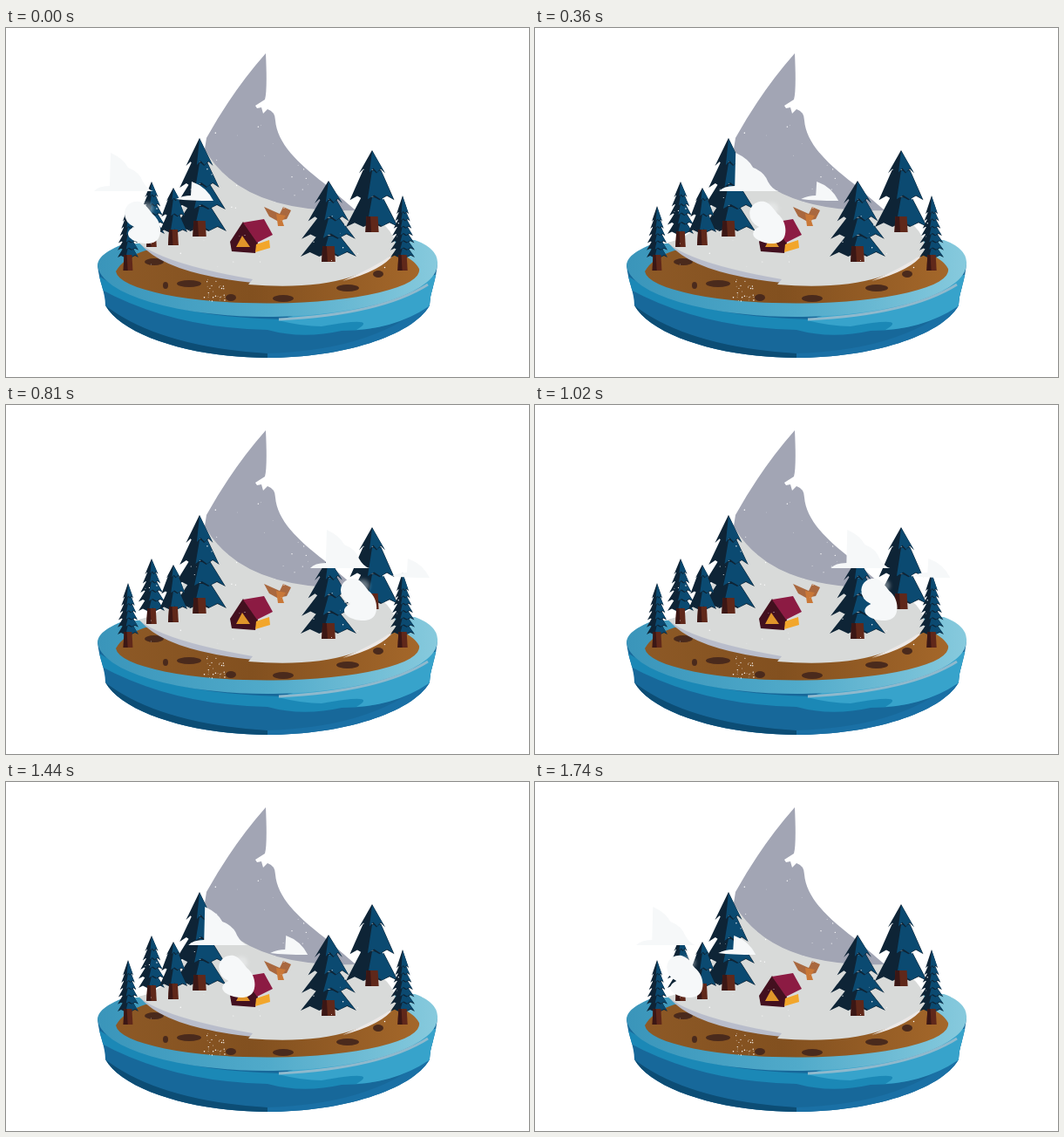
Recreate the animation shown at these times as an HTML page. Size 600x400 px, loop 1770 ms.

```html
<!DOCTYPE html>
<html lang="en">
<head>
<meta charset="utf-8">
<title>Snowy island</title>
<style>
html, body { margin: 0; width: 100%; height: 100%; overflow: hidden; background: #fff; }
svg { display: block; width: 600px; height: 400px; }
.dark { fill: #0e2436; }
.blue { fill: #0b4a71; }
.trunk { fill: #60281a; }
.bark { fill: #3b1715; }
</style>
</head>
<body>
<svg viewBox="0 0 600 400">
  <defs>
    <linearGradient id="rim"><stop offset="0" stop-color="#3a95ba"/><stop offset=".5" stop-color="#50aaca"/><stop offset="1" stop-color="#87cadd"/></linearGradient>
    <linearGradient id="soil"><stop offset="0" stop-color="#8d5926"/><stop offset=".45" stop-color="#82501f"/><stop offset="1" stop-color="#a4672a"/></linearGradient>
    <filter id="soft" x="-50%" y="-50%" width="200%" height="200%"><feGaussianBlur stdDeviation="2"/></filter>
    <clipPath id="hull"><path d="M105 272 C107 292 114 302 114 318 C134 353 215 378 300 378 C385 378 466 353 486 318 C486 303 494 290 495 268Z"/></clipPath>
  </defs>

  <!-- water -->
  <g clip-path="url(#hull)">
    <path fill="#17689a" d="M100 260H500V380H100Z"/>
    <path fill="#0c4d75" d="M100 306 Q160 364 300 373 V390 H100Z"/>
    <path fill="#1a70a5" d="M300 373 Q430 369 490 308 V390 H300Z"/>
    <path fill="#1b88b6" d="M106 284 Q180 334 330 334 L490 288 V312 Q450 347 385 347 Q340 357 300 346 Q190 344 106 298Z"/>
    <path fill="#37a3cb" d="M312 335 L495 282 V312 Q455 343 402 346 Q430 330 362 342 Q340 342 312 335Z"/>
  </g>
  <path fill="url(#rim)" d="M160 246 L131 249 Q105 260 105 272 A195 61 0 0 0 495 268 Q494 252 469 243 L440 244Z"/>
  <path fill="none" stroke="#8fb9cd" stroke-width="3" d="M313 334 Q430 328 484 294"/>

  <!-- soil -->
  <path fill="url(#soil)" d="M126 279 Q135 263 160 255 L445 256 Q468 264 474 276 A174 38 0 0 1 126 279Z"/>
  <g id="rocks" fill="#4a2a1c"></g>

  <!-- snow and mountain -->
  <path fill="#b9bdcb" d="M153 246 Q180 281 283 292 V287 L200 255Z"/>
  <path fill="#d8dad9" d="M229 137 Q204 236 152 246 Q180 270 283 288 L278 294 Q400 304 448 255 Q446 222 400 208Z"/>
  <path fill="#ece8e6" d="M386 290 Q420 276 446 258 Q432 278 386 290Z"/>
  <path fill="#a2a5b4" d="M298 29 Q300 72 297 82 L286 89 L288 92 L293 91 L295 98 L300 93 Q309 96 309 106 C311 132 335 155 365 178 L401 209 Q270 213 228 139 L230 126 Q260 72 298 29Z"/>

  <g id="trees"></g>

  <!-- cabin -->
  <path fill="#43101f" d="M272 222 L257 245 L259 256 L286 258 L289 246Z"/>
  <path fill="#8c1b43" d="M272 223 L296 219 L306 237 L288 246Z"/>
  <path fill="#f2a62b" d="M287 248 L302 243 L303 252 L286 257Z"/>
  <path fill="#e0952a" d="M264 251 L271 238 L280 251Z"/>

  <!-- bird -->
  <path fill="#a9683f" d="M296 205 L314 213 L318 205 L327 209 L322 219 L311 221 L302 216Z"/>
  <path fill="#c97838" d="M310 213 L321 215 L317 221 L319 227 L312 227Z"/>

  <g id="flakes" fill="#fff"></g>

  <!-- clouds -->
  <g id="clouds" fill="#f6f8f9">
    <path d="M120 143 Q135 150 140 160 Q153 165 157 176 Q162 185 169 187 H101 Q106 181 119 181Z"/>
    <path d="M213 176 Q230 182 238 198 Q210 198 195 196 Q203 192 212 192Z"/>
    <ellipse cx="161" cy="207" rx="8" ry="7" opacity=".4" filter="url(#soft)"/>
    <path d="M136 212 C137 202 145 198 153 199 C160 201 164 208 168 213 C178 221 179 234 175 241 C168 253 140 245 140 236 Q140 231 147 228 Q136 223 136 212Z"/>
  </g>
</svg>
<script>
const $ = id => document.getElementById(id);
const NS = 'http://www.w3.org/2000/svg';

function add(parent, tag, attrs) {
  const el = document.createElementNS(NS, tag);
  for (const key in attrs) el.setAttribute(key, attrs[key]);
  $(parent).append(el);
}

const poly = (cls, points) => add('trees', 'polygon', { class: cls, points: points.join(' ') });

// Ragged hem from x1 to x2, its teeth alternating in height.
function hem(x1, x2, y, teeth, depth) {
  return Array.from({ length: teeth + 1 }, (_, i) =>
    [x1 + (x2 - x1) * i / teeth, y - (i % 2) * depth]);
}

// Overlapping skirts, lit on the right, with a tall cap on top.
function tree(x, top, bottom, half, tiers) {
  const height = bottom - top;
  const level = i => i && .3 + .7 * (i - 1) / (tiers - 1);
  const width = f => half * Math.min(1, .2 + f);
  for (let i = tiers; i > 0; i--) {
    const f = level(i), y = top + f * height, w = width(f);
    const peak = top + level(i - 1) * height - (i > 1 ? 4 : 0);
    const neck = i > 1 ? w * .4 : 0;
    const depth = half * .16;
    poly('dark', [[x - neck, peak], [x + neck, peak], ...hem(x + w, x - w, y, 6, depth)]);
    poly('blue', [[x, peak + 1], [x + neck, peak + 1], ...hem(x + w * .96, x - w * .2, y - 1, 4, depth)]);
  }
  const t = 3 + half * .12, base = bottom + 15, head = bottom - 3;
  const low = half > 20 ? -9 : 0;
  const stem = (cls, x1, x2) => poly(cls, [[x1, head + low], [x2, head + low], [x2 + 1, base + low], [x1 - 1, base + low]]);
  stem('trunk', x - t, x + t);
  stem('bark', x - t, x - t * .3);
}

tree(222, 126, 233, 31, 4);
tree(420, 140, 228, 30, 3);
tree(167, 176, 236, 15, 5);
tree(192, 183, 234, 16, 3);
tree(370, 175, 262, 32, 4);
tree(140, 204, 263, 12, 6);
tree(455, 192, 263, 14, 7);

const rocks = [[210, 293, 14], [183, 295, 3], [258, 309, 6], [318, 310, 12], [392, 298, 13], [427, 282, 6], [170, 268, 11]];
for (const [cx, cy, rx] of rocks) add('rocks', 'ellipse', { cx, cy, rx, ry: 4 });

let seed = 17;
const rand = () => (seed = seed * 16807 % 2147483647) / 2147483647;

function flakes(n, x, y, w, h) {
  while (n--) add('flakes', 'circle', { cx: x + rand() * w, cy: y + rand() * h, r: .3 + rand() * .5 });
}
flakes(90, 130, 110, 340, 165);
flakes(28, 226, 288, 25, 25);

// Clouds drift right, then back, at an even pace.
const LOOP = 1770, TICK = 30, TURN = 900, REACH = 275.5, END = 6;
const start = performance.now();

function draw(now) {
  const t = Math.floor(Math.max(0, now - start) % LOOP / TICK) * TICK;
  const x = t < TURN ? REACH * t / TURN : REACH - (REACH - END) * (t - TURN) / (LOOP - TURN);
  $('clouds').setAttribute('transform', `translate(${x.toFixed(2)} 0)`);
  requestAnimationFrame(draw);
}
draw(start);
</script>
</body>
</html>
```
